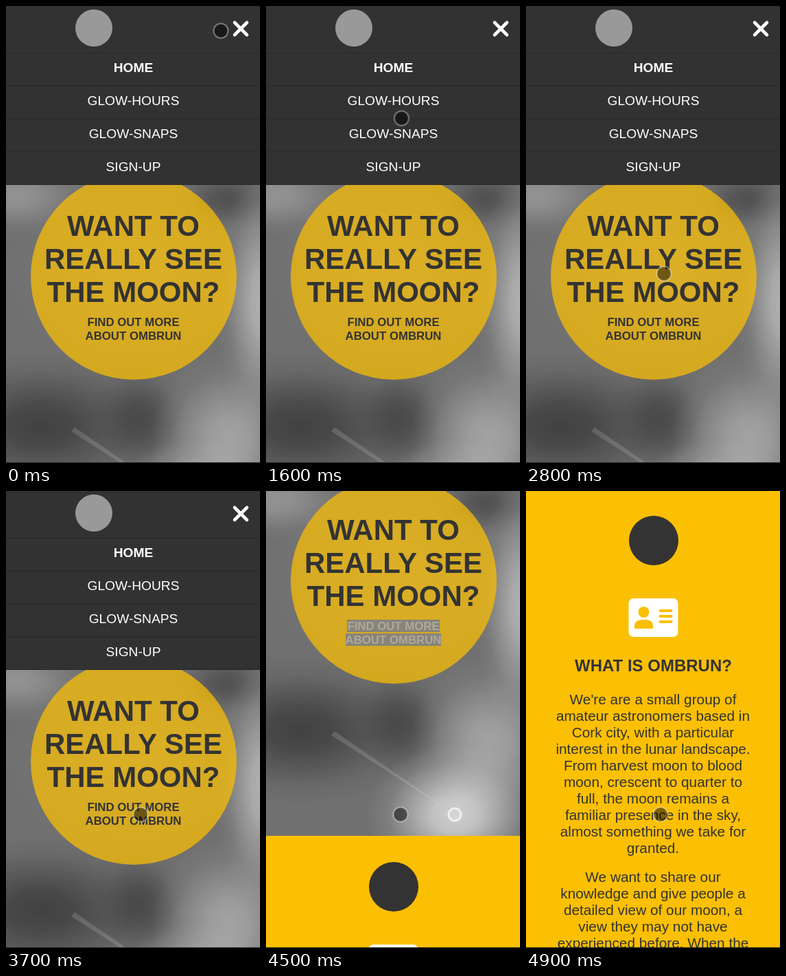
Write an HTML page that moves like this. It is 370 px wide and 664 px high and loops after 5 s.

```html
<!DOCTYPE html>
<html lang="en">
<head>
<meta charset="utf-8">
<title>Night sky menu</title>
<style>
  html, body { margin: 0; width: 100%; height: 100%; overflow: hidden; background: #fbbf04; }
  svg { display: block; width: 370px; height: 664px; overflow: hidden; }
  text { font-family: "Liberation Sans", Arial, Helvetica, sans-serif; text-anchor: middle; fill: #333; }
  .bold { font-weight: 700; }
  .menu { font-size: 19.2px; fill: #fff; }
  .title { font-size: 42px; }
  .link { font-size: 16.8px; }
  .head { font-size: 24px; }
  .copy { font-size: 20.8px; }
  #tap text { fill: #b0a99a; }
</style>
</head>
<body>
<svg viewBox="0 0 370 664">
  <defs>
    <clipPath id="sky"><rect y="260" width="370" height="504"/></clipPath>
  </defs>
  <g id="page">
    <g id="moon" clip-path="url(#sky)">
      <rect y="260" width="370" height="504" fill="#707070"/>
    </g>
    <circle cx="186" cy="393" r="150" fill="#fbbf04" fill-opacity=".73"/>
    <g id="hero"></g>
    <g id="tap" fill="#87847a">
      <rect x="118" y="450" width="135" height="18"/>
      <rect x="116" y="470" width="139" height="18"/>
    </g>

    <rect width="370" height="260" fill="#323232"/>
    <g id="rules" stroke="#282828"></g>
    <circle cx="128" cy="32" r="27" fill="#999"/>
    <path d="M333 24l18 18M351 24l-18 18" stroke="#fff" stroke-width="4.6" stroke-linecap="round"/>
    <g id="menu"></g>

    <rect y="764" width="370" height="700" fill="#fbbf04"/>
    <circle cx="186" cy="838" r="36" fill="#333"/>
    <rect x="149.5" y="922" width="72" height="56" rx="7" fill="#fff"/>
    <g fill="#fbbf04">
      <circle cx="171.5" cy="942" r="8"/>
      <path d="M158 966v-3q0-10 10-10h7q10 0 10 10v3z"/>
    </g>
    <path d="M195.5 940h16M195.5 948h16M195.5 956h16" stroke="#fbbf04" stroke-width="4" stroke-linecap="round"/>
    <g id="about"></g>
  </g>
  <rect y="663" width="370" height="1" fill="#1c1c1c"/>
  <g id="cursor">
    <circle r="10.5" fill="#000" fill-opacity=".5" stroke="#fff" stroke-opacity=".38" stroke-width="2"/>
  </g>
</svg>
<script>
const LOOP = 5000;
const FRAME = 100;
const $ = id => document.getElementById(id);

function add(parent, tag, attrs, content) {
  const node = document.createElementNS("http://www.w3.org/2000/svg", tag);
  for (const key in attrs) node.setAttribute(key, attrs[key]);
  if (content) node.textContent = content;
  return parent.appendChild(node);
}

function lines(id, cls, y, step, list, x = 185.5) {
  list.forEach((s, i) => add($(id), "text", { x, y: y + i * step, class: cls }, s));
}

lines("menu", "menu bold", 96, 48, ["HOME"]);
lines("menu", "menu", 144, 48, ["GLOW-HOURS", "GLOW-SNAPS", "SIGN-UP"]);
for (let i = 0; i < 5; i++) add($("rules"), "path", { d: `M0 ${68.5 + i * 47.75}H370` });

const link = ["FIND OUT MORE", "ABOUT OMBRUN"];
lines("hero", "title bold", 334, 48, ["WANT TO", "REALLY SEE", "THE MOON?"]);
for (const id of ["hero", "tap"]) lines(id, "link bold", 465, 20, link);

lines("about", "head bold", 1028, 0, ["WHAT IS OMBRUN?"]);
lines("about", "copy", 1076, 24, [
  "We're are a small group of",
  "amateur astronomers based in",
  "Cork city, with a particular",
  "interest in the lunar landscape.",
  "From harvest moon to blood",
  "moon, crescent to quarter to",
  "full, the moon remains a",
  "familiar presence in the sky,",
  "almost something we take for",
  "granted."
], 185);
lines("about", "copy", 1334, 24, [
  "We want to share our",
  "knowledge and give people a",
  "detailed view of our moon, a",
  "view they may not have",
  "experienced before. When the"
], 185);

// Soft light or dark patch of the lunar surface
function patch(cx, cy, rx, ry, color, alpha) {
  const id = `fade${cx}-${cy}`;
  const fade = add(document.querySelector("defs"), "radialGradient", { id });
  for (const offset of [0, .25, .5, .75, 1]) {
    add(fade, "stop", {
      offset, "stop-color": color,
      "stop-opacity": alpha * (1 + Math.cos(Math.PI * offset)) / 2
    });
  }
  add($("moon"), "ellipse", { cx, cy, rx, ry, fill: `url(#${id})` });
}

const crater = { cx: 275, cy: 733 };
patch(186, 380, 190, 150, "#909090", .6);
patch(15, 275, 110, 60, "#aaa", .6);
patch(320, 280, 75, 50, "#444", .7);
patch(375, 430, 70, 190, "#c8c8c8", .75);
patch(50, 610, 200, 110, "#363636", .8);
patch(195, 600, 75, 85, "#3c3c3c", .7);
patch(325, 630, 115, 130, "#b4b4b4", .75);
patch(crater.cx, crater.cy, 130, 105, "#eee", .75);

add($("moon"), "path", { d: "M275 733L95 618L100 612z", fill: "#fff", "fill-opacity": .14 });
add($("moon"), "circle", { ...crater, r: 9, fill: "#d4d4d4", stroke: "#f0f0f0", "stroke-width": 3 });

const easeOut = u => 1 - (1 - u) ** 1.57;
const progress = (t, from, to) => Math.min(1, Math.max(0, (t - from) / (to - from)));
const move = (x, y) => ({ transform: `translate(${x}px, ${y}px)` });

// Glide to the menu, rest, then drift down to the link
function cursorAt(t) {
  const a = easeOut(progress(t, 0, 1100));
  const u = progress(t, 1400, 3700);
  return move(313 - 117 * a + 5.3 * Math.sin(Math.PI * u), 36 + 80 * a + 354 * easeOut(u));
}

// Smooth scroll along a logistic curve
const TAP = 4200;
const scrollAt = t => t < TAP ? 0 : Math.round(769 / (1 + Math.exp((4542 - t) / 64.3)));

function play(id, pose) {
  const frames = [];
  for (let t = 0; t <= LOOP; t += FRAME) {
    frames.push({ offset: t / LOOP, easing: "step-end", ...pose(Math.min(t, LOOP - FRAME)) });
  }
  $(id).animate(frames, { duration: LOOP, iterations: Infinity });
}

play("cursor", cursorAt);
play("page", t => move(0, -scrollAt(t)));
play("tap", t => ({ opacity: t < TAP ? 0 : 1 }));
</script>
</body>
</html>
```
